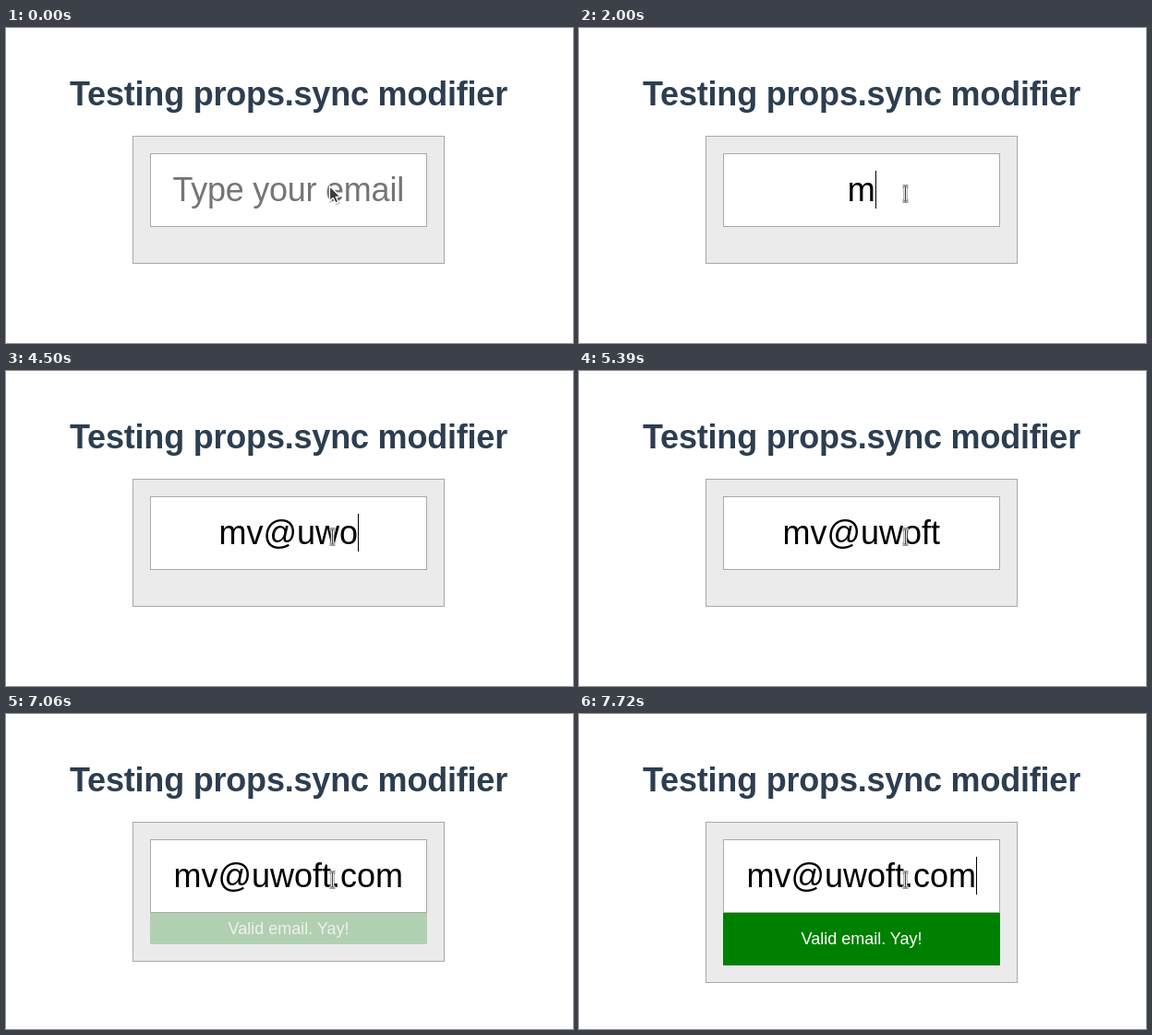
Animation, 614 px wide and 342 px high, one loop 8000 ms. Source, as an HTML page:

```html
<!DOCTYPE html>
<html lang="en">
<head>
<meta charset="utf-8">
<title>Testing props.sync modifier</title>
<style>
  html, body { margin: 0; width: 100%; height: 100%; overflow: hidden; background: #fff; }
  svg { display: block; font-family: "Liberation Sans", Arial, sans-serif; }
  text { text-anchor: middle; white-space: pre; }
  .title { letter-spacing: -.2px; }
  .hint { letter-spacing: -.25px; fill: #757575; }
</style>
</head>
<body>
<svg width="614" height="342" viewBox="0 0 614 342">
  <text class="title" x="306" y="84" font-size="36" font-weight="700" fill="#2c3e50">Testing props.sync modifier</text>
  <rect id="panel" x="137.5" y="117.5" width="337" height="138" fill="#ebebeb" stroke="#a9a9a9"/>
  <rect x="156.5" y="136.5" width="299" height="79" fill="#fff" stroke="#a9a9a9"/>
  <g id="note" opacity="0">
    <rect id="noteBox" x="156" y="216" width="300" height="21" fill="#008000"/>
    <text id="noteText" x="306" y="232" font-size="18" fill="#fff">Valid email. Yay!</text>
  </g>
  <text id="field" x="305.7" y="188" font-size="36"></text>
  <rect id="caret" width="1" height="41"/>
  <g id="arrow" stroke-linejoin="round">
    <path d="M351 172V189L355 186L358 191.5L361 190L358.500 185H363Z" fill="none" stroke="#000" stroke-opacity=".18" stroke-width="2"/>
    <path d="M350.500 171.500V187.500L354.300 184.500L357 190L359.800 188.600L357.200 183.400L361.800 183Z" fill="#3a3a3a" stroke="#fff" stroke-width="1.200"/>
  </g>
  <g id="beam" fill="none">
    <path d="M350.500 172H356.500M353.500 172V188M350.500 188H356.500" stroke="#777" stroke-width="4"/>
    <path d="M350.500 172H356.500M353.500 172V188M350.500 188H356.500" stroke="#fff" stroke-width="2.600"/>
    <path d="M351 172H356M353.500 172V188M351 188H356" stroke="#444" stroke-width="1"/>
  </g>
</svg>
<script>
const LOOP = 8000;
const ADDRESS = "mv@uwoft.com";
const KEYS = [2000, 2220, 3000, 4110, 4330, 4500, 4670, 4780, 5440, 5670, 6110, 6500];
const CARET = [[890, 1440], [2000, 2830], [3000, 3610], [4110, 5390], [5440, 7000], [7720, LOOP]];
// The fade trails the padding by one 60 Hz frame.
const NOTE = { start: 7000, step: 55, lead: 14, lag: 16, span: 300 };

const el = id => document.getElementById(id);
const [panel, note, noteBox, noteText, field, caret, arrow, beam] =
  ["panel", "note", "noteBox", "noteText", "field", "caret", "arrow", "beam"].map(el);
const set = (node, attrs) => { for (const k in attrs) node.setAttribute(k, attrs[k]); };
const show = (node, on) => set(node, { visibility: on ? "visible" : "hidden" });

// CSS "ease": cubic-bezier(.25, .1, .25, 1)
function ease(x) {
  if (x <= 0) return 0;
  if (x >= 1) return 1;
  const bez = (a, b, s) => 3 * a * s * (1 - s) ** 2 + 3 * b * s * s * (1 - s) + s ** 3;
  let lo = 0, hi = 1;
  for (let i = 0; i < 24; i++) {
    const mid = (lo + hi) / 2;
    if (bez(.25, .25, mid) < x) lo = mid; else hi = mid;
  }
  return bez(.1, 1, lo);
}

function drawField(t) {
  const typed = ADDRESS.slice(0, KEYS.filter(k => t >= k).length);
  const text = typed || "Type your email";
  if (field.textContent !== text) field.textContent = text;
  set(field, { class: typed ? "" : "hint" });
  const width = typed ? field.getComputedTextLength() : 0;
  set(caret, { x: Math.floor(306.5 + width / 2), y: typed ? 155 : 156 });
  show(caret, CARET.some(([on, off]) => t >= on && t < off));
}

function drawNote(t) {
  const tick = Math.floor((t - NOTE.start) / NOTE.step);
  const time = tick < 0 ? 0 : tick * NOTE.step + NOTE.lead;
  const pad = 18 * ease(time / NOTE.span);
  set(panel, { height: Math.round(138 + 2 * pad) });
  set(noteBox, { height: Math.round(21 + 2 * pad) });
  set(noteText, { y: Math.round(232 + pad) });
  set(note, { opacity: ease((time - NOTE.lag) / NOTE.span) });
}

function draw(t) {
  drawField(t);
  drawNote(t);
  show(arrow, t < 440);
  show(beam, t >= 440);
}

const began = performance.now();
function tick() {
  draw((performance.now() - began) % LOOP);
  requestAnimationFrame(tick);
}
draw(0);
requestAnimationFrame(tick);
</script>
</body>
</html>
```
